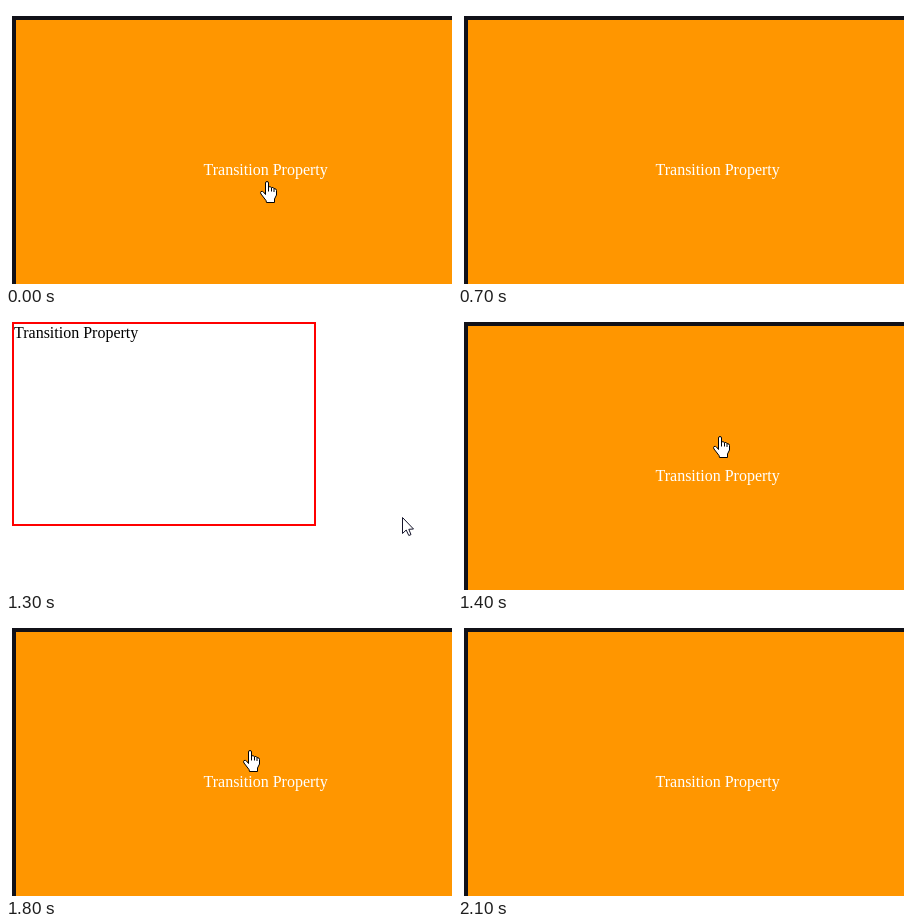
An HTML page with a canvas that plays this animation: 446x278 px, repeating every 2.6 s.

```html
<!DOCTYPE html>
<html lang="en">
<head>
<meta charset="utf-8">
<title>Transition Property</title>
<style>
html, body { margin: 0; width: 100%; height: 100%; overflow: hidden; background: #fff; }
canvas { display: block; }
</style>
</head>
<body>
<canvas id="stage" width="446" height="278"></canvas>
<script>
const ctx = document.getElementById('stage').getContext('2d');
const LOOP = 2600;
const LABEL = 'Transition Property';

const handShape = new Path2D(
  'M5.5 13.5V2Q5.5 .5 7 .5Q8.5 .5 8.5 2V6Q10 5 11.5 6.5Q13 6 14 7.5' +
  'Q16.5 7.5 16.5 9.5V14L14.5 18V21.5H6.5L6 19.5L1 13Q0 11.5 1 10.5Q2.5 10 3.5 11Z');
const knuckles = new Path2D('M8.5 6V10.5M11.5 7V10.5M14 8V11');
const arrowShape = new Path2D(
  'M.5 .5V16.5L4.2 13L6.8 18.5L9 17.6L6.8 12.3L11.5 12Z');

// Each step holds until the next: start time, box hovered, cursor x, y
const steps = [
  [0, true, 254, 175],
  [100, true, 249, 180],
  [500, true, 262, 204],
  [600, true, 298, 252],
  [700, true],
  [800, false],
  [1300, false, 396, 205],
  [1400, true, 255, 124],
  [1500, true, 247, 118],
  [1800, true, 237, 132],
  [1900, true, 189, 186],
  [2000, true, 124, 258],
  [2100, true]
];

function drawBox(width, height, border, edge, fill) {
  ctx.fillStyle = edge;
  ctx.fillRect(6, 10, width + 2 * border, height + 2 * border);
  ctx.fillStyle = fill;
  ctx.fillRect(6 + border, 10 + border, width, height);
}

function drawLabel(x, y, color) {
  ctx.font = '16px "Liberation Serif", "Times New Roman", serif';
  ctx.fillStyle = color;
  ctx.fillText(LABEL, x, y);
}

function drawCursor(x, y, hand) {
  const shape = hand ? handShape : arrowShape;
  ctx.save();
  ctx.translate(x, y);
  ctx.lineJoin = 'round';
  ctx.lineWidth = 1;
  ctx.fillStyle = '#fff';
  ctx.strokeStyle = hand ? '#000' : '#14142a';
  ctx.fill(shape);
  ctx.stroke(shape);
  if (hand) ctx.stroke(knuckles);
  ctx.restore();
}

function draw(time) {
  const [, hovered, x, y] = steps.findLast(step => step[0] <= time);
  ctx.fillStyle = '#fff';
  ctx.fillRect(0, 0, 446, 278);
  if (hovered) {
    drawBox(500, 300, 4, '#111118', '#ff9600');
    drawLabel(197.5, 169, '#fff');
  } else {
    drawBox(300, 200, 2, '#f00', '#fff');
    drawLabel(8, 26, '#000');
  }
  if (x !== undefined) drawCursor(x, y, hovered);
}

const start = performance.now();
function tick() {
  draw((performance.now() - start) % LOOP);
  requestAnimationFrame(tick);
}
tick();
</script>
</body>
</html>
```
